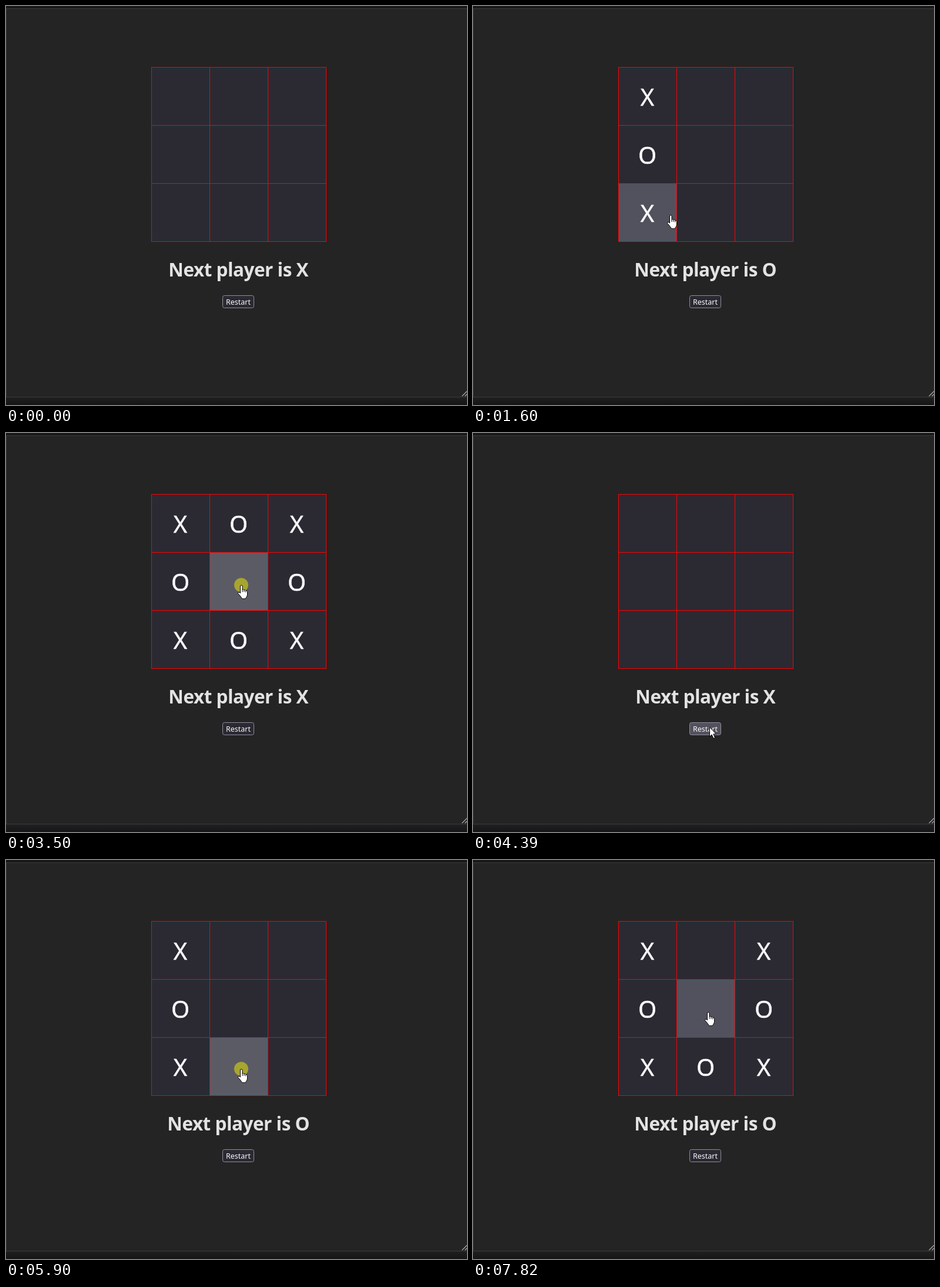
Write an HTML page that moves like this. It is 784 px wide and 680 px high and loops after 8000 ms.

```html
<!DOCTYPE html>
<html lang="en">
<head>
<meta charset="utf-8">
<title>Noughts and crosses</title>
<style>
html, body { margin: 0; width: 100%; height: 100%; overflow: hidden; background: #242424; }
svg { display: block; font-family: "Noto Sans", "Open Sans", sans-serif; text-anchor: middle; }
#cells rect { stroke: #f00; }
.mark { font-size: 40px; fill: #fbfbfe; stroke: #fbfbfe; stroke-width: .5px; }
#status { font-size: 31.5px; font-weight: 700; letter-spacing: -.5px; fill: #e3e3e3; }
#label { font-size: 12.5px; fill: #fbfbfe; }
#cursor path { fill: #fff; stroke: #000; }
</style>
</head>
<body>
<svg width="784" height="680" viewBox="0 0 784 680">
  <defs>
    <linearGradient id="shade" x2="0" y2="1">
      <stop stop-color="#202021"/><stop offset="1" stop-color="#151517"/>
    </linearGradient>
  </defs>
  <rect width="784" height="680" fill="#242424"/>
  <rect width="784" height="4" fill="#18181a"/>
  <rect y="667" width="784" height="13" fill="url(#shade)"/>
  <path d="M784 4.5H.5V666.5H784" fill="none" stroke="#3b3b3c"/>
  <path d="M775.5 665L784 656.5M780.5 665L784 661.5" stroke="#a5a5a5" stroke-width="1.3"/>
  <g id="cells"></g>
  <g id="marks"></g>
  <text id="status" x="395.2" y="461"></text>
  <rect id="restart" x="368.5" y="493.5" width="53" height="21" rx="3" stroke="#8f8f9d"/>
  <text id="label" x="395" y="509">Restart</text>
  <g id="cursor">
    <circle id="press" r="12" fill="#a7a530"/>
    <path id="hand" d="M-1.5 13V2Q-1.5 .5 .2 .5T2 2V8Q3.8 7 5 8.5Q6.8 7.8 7.8 9.5Q10.5 9 10.5 11.5V16Q10.5 18.5 9 20.5Q8.5 23.5 5 23.5H3Q.5 23.5 0 21Q-2 18 -5.3 14.5Q-6 12.3 -4 12.3Q-2.8 12.5 -1.5 14ZM2 8V12M5 9V12M7.8 10V12.5"/>
    <path id="arrow" d="M.5 .5V16.5L4 13L7 19.5L9.5 18.3L6.8 12H11.5Z"/>
    <path id="beam" d="M-3 -8H3M0 -8V8M-3 8H3" style="stroke:#ccc"/>
  </g>
</svg>
<script>
const LOOP = 8000, ENTER = 130, RESTART = 9;
const DWELL = 112, PRESS = 140;
const IDLE = '#2b2a33', HOVER = '#52525e', ACTIVE = '#5b5b66';
const LINES = ['012', '345', '678', '036', '147', '258', '048', '246'];
const $ = id => document.getElementById(id);
const col = i => i % 3, row = i => Math.floor(i / 3);

// Each visit glides to a spot and clicks it, letting go at the given time
const visits = [{ spot: -1, x: 609, y: 456, release: ENTER - DWELL }];
function visit(spot, release) {
  const [x, y] = spot === RESTART ? [402, 501] : [308 + col(spot) * 92, 162 + row(spot) * 97];
  visits.push({ spot, x, y, release });
}
const play = (order, first, step) => [...order].forEach((c, i) => visit(+c, first + i * step));

play('036785214', 765, 345);
visit(RESTART, 4390);
play('0367852', 4990, 350);
visit(4, Infinity);

function add(parent, tag, attrs) {
  const el = document.createElementNS('http://www.w3.org/2000/svg', tag);
  for (const key in attrs) el.setAttribute(key, attrs[key]);
  return $(parent).appendChild(el);
}

const cells = [], marks = [];
for (let i = 0; i < 9; i++) {
  const x = 247.5 + col(i) * 99, y = 104.5 + row(i) * 99;
  cells.push(add('cells', 'rect', { x, y, width: 99, height: 99 }));
  marks.push(add('marks', 'text', { class: 'mark', x: x + 49, y: y + 65.5 }));
}

function pointer(t) {
  const i = visits.findIndex(v => v.release > t && v.spot >= 0);
  const from = visits[i - 1], to = visits[i];
  const dx = to.x - from.x, dy = to.y - from.y;
  // One millisecond per pixel, eased at both ends
  const k = Math.min(1, Math.max(0, (t - from.release - DWELL) / Math.hypot(dx, dy)));
  const ease = k * k * (3 - 2 * k);
  return { x: from.x + dx * ease, y: from.y + dy * ease, pressed: t >= to.release - PRESS };
}

function target(x, y) {
  const c = Math.floor((x - 247) / 99), r = Math.floor((y - 104) / 99);
  if (c >= 0 && c < 3 && r >= 0 && r < 3) return r * 3 + c;
  return x >= 368 && x < 422 && y >= 493 && y < 515 ? RESTART : -1;
}

function game(t) {
  let board = [], turns = 0;
  for (const { spot, release } of visits) {
    if (release > t) break;
    if (spot === RESTART) { board = []; turns = 0; }
    else if (spot >= 0) board[spot] = 'XO'[turns++ % 2];
  }
  const won = LINES.find(([a, b, c]) => board[a] && board[a] === board[b] && board[a] === board[c]);
  const status = won ? 'Winner is ' + board[won[0]] : 'Next player is ' + 'XO'[turns % 2];
  return { board, status };
}

const show = (id, on) => $(id).style.display = on ? '' : 'none';

function draw(t) {
  const { x, y, pressed } = pointer(t);
  const { board, status } = game(t);
  const over = target(x, y);
  const fill = i => i !== over ? IDLE : pressed ? ACTIVE : HOVER;

  cells.forEach((cell, i) => cell.setAttribute('fill', fill(i)));
  marks.forEach((mark, i) => mark.textContent = board[i] || '');
  $('restart').setAttribute('fill', fill(RESTART));
  $('status').textContent = status;

  const onText = x > 275 && x < 515 && y > 430 && y < 472;
  const onCell = over >= 0 && over < RESTART;
  show('cursor', t >= ENTER);
  show('press', pressed);
  show('hand', onCell);
  show('beam', onText);
  show('arrow', !onCell && !onText);
  $('cursor').setAttribute('transform', `translate(${Math.round(x)} ${Math.round(y)})`);
}

const start = performance.now();
function frame() {
  draw((performance.now() - start) % LOOP);
  requestAnimationFrame(frame);
}
frame();
</script>
</body>
</html>
```
